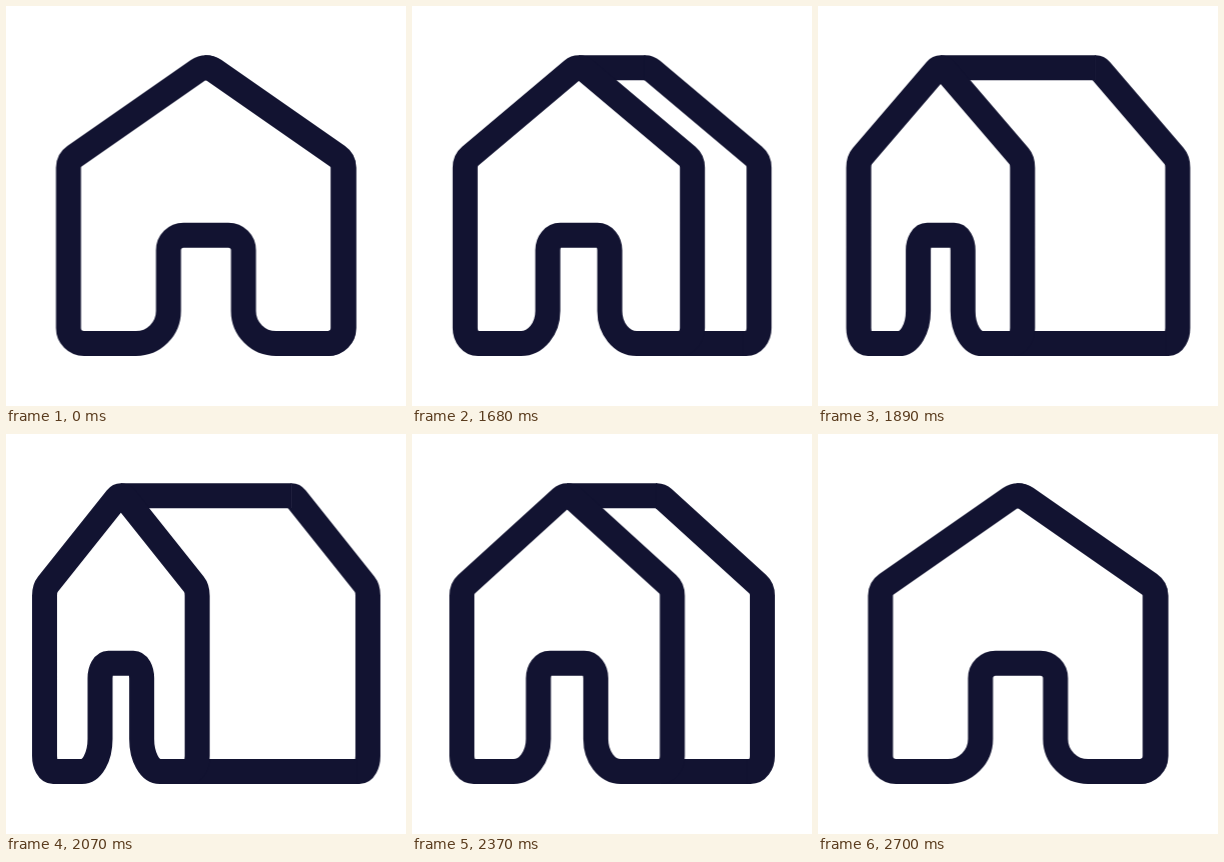
Recreate the animation shown at these times as an HTML page without scripts. Size 400x400 px, loop 2.73 s.

```html
<!DOCTYPE html>
<html lang="en">
<head>
<meta charset="utf-8">
<title>House</title>
<style>
  html, body { margin: 0; width: 100%; height: 100%; overflow: hidden; background: #fff; }
  svg { display: block; width: 100vw; height: 100vh; }

  path {
    fill: none;
    stroke: #121331;
    stroke-width: 25;
    vector-effect: non-scaling-stroke;
    animation: 2730ms infinite;
  }
  .front { animation-name: front; }
  .back { animation-name: back; }
  .ridge { animation-name: ridge; }
  .base { animation-name: base; }

  /* rest, turn to the side, turn back */
  @keyframes front {
    0%, 98.9%, 100% { transform: translateX(62.5px) scaleX(1); }
    55.49% { transform: translateX(62.5px) scaleX(1); animation-timing-function: cubic-bezier(.335, 0, .21, 1); }
    76.92% { transform: translateX(38.5px) scaleX(.5545); animation-timing-function: cubic-bezier(.55, 0, .35, 1); }
  }
  @keyframes back {
    0%, 98.9%, 100% { transform: translateX(337.5px) scaleX(-1); }
    55.49% { transform: translateX(337.5px) scaleX(-1); animation-timing-function: cubic-bezier(.335, 0, .21, 1); }
    76.92% { transform: translateX(362px) scaleX(-.5545); animation-timing-function: cubic-bezier(.55, 0, .35, 1); }
  }
  @keyframes ridge {
    0%, 98.9%, 100% { d: path("M200 61.75H200"); }
    55.49% { d: path("M200 61.75H200"); animation-timing-function: cubic-bezier(.335, 0, .21, 1); }
    76.92% { d: path("M114.75 61.75H285.75"); animation-timing-function: cubic-bezier(.55, 0, .35, 1); }
  }
  @keyframes base {
    0%, 98.9%, 100% { d: path("M322 337.5H322"); }
    55.49% { d: path("M322 337.5H322"); animation-timing-function: cubic-bezier(.335, 0, .21, 1); }
    76.92% { d: path("M182.4 337.5H353.4"); animation-timing-function: cubic-bezier(.55, 0, .35, 1); }
  }
</style>
</head>
<body>
<svg viewBox="0 0 400 400">
  <path class="ridge" d="M200 61.75H200"/>
  <path class="base" d="M322 337.5H322"/>
  <path class="back" d="M139 61.75H137.5A14 14 0 0 0 129.5 64.3L6 150.2A14 14 0 0 0 0 161.7V322A15.5 15.5 0 0 0 15.5 337.5H20"/>
  <path class="front" d="M129.5 64.3A14 14 0 0 1 145.5 64.3L269 150.2A14 14 0 0 1 275 161.7V322A15.5 15.5 0 0 1 259.5 337.5
    H207.5A32.5 32.5 0 0 1 175 305V244.2A15 15 0 0 0 160 229.2H115A15 15 0 0 0 100 244.2V305A32.5 32.5 0 0 1 67.5 337.5
    H15.5A15.5 15.5 0 0 1 0 322V161.7A14 14 0 0 1 6 150.2Z"/>
</svg>
</body>
</html>
```
